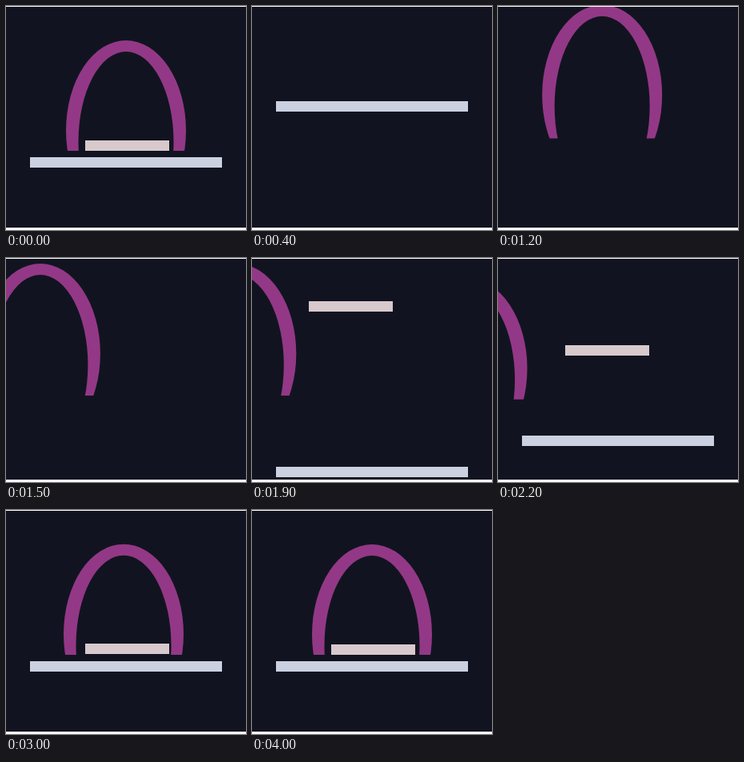
An HTML page with a canvas for the animation above (5100 ms loop, 300 by 280 pixels).

```html
<!DOCTYPE html>
<html lang="en">
<head>
<meta charset="utf-8">
<title>Arch and bars</title>
<style>
  html, body { margin: 0; width: 100%; height: 100%; overflow: hidden; background: #fff; }
  canvas { display: block; }
</style>
</head>
<body>
<canvas id="stage" width="300" height="280"></canvas>
<script>
const ctx = document.getElementById('stage').getContext('2d');
const LOOP = 5100;
const STEP = 100;

// Share of a decelerating move that is still to come: 1 at start, 0 at end.
function remaining(t, start, end, power = 3) {
  const left = (end - t) / (end - start);
  return Math.min(1, Math.max(0, left)) ** power;
}

// The outer ellipse minus a lowered inner one, cut off flat at the floor.
function drawArch(x, y, floor) {
  ctx.save();
  ctx.beginPath();
  ctx.rect(0, 0, 300, floor);
  ctx.clip();
  ctx.beginPath();
  ctx.ellipse(x, y, 75, 112.5, 0, 0, Math.PI * 2);
  ctx.closePath();
  ctx.moveTo(x + 59.5, y + 14);
  ctx.ellipse(x, y + 14, 59.5, 112.5, 0, 0, Math.PI * 2);
  ctx.fillStyle = '#933886';
  ctx.fill('evenodd');
  ctx.restore();
}

function drawMovingArch(t) {
  const x = t <= 2500
    ? -43.5 + 361.5 * remaining(t, 800, 2645)
    : 150 - 193.5 * remaining(t, 2500, 3166);
  const fall = remaining(t, 800, 1400, 2);
  const drift = remaining(t, 1900, 3300);
  drawArch(x, 155.5 - 74 * fall - 36 * drift, 181 - 59 * fall - 9 * drift);
}

function drawBar(x, y, width, color) {
  ctx.fillStyle = color;
  ctx.fillRect(Math.round(x), Math.round(y), width, 13);
}

const drawBase = y => drawBar(30, y, 240, '#cbd1e0');
const drawSill = lift => drawBar(99 - 0.245 * lift, 168 - lift, 105, '#d8c9cd');

function draw(t) {
  ctx.fillStyle = '#fff';
  ctx.fillRect(0, 0, 300, 280);
  ctx.save();
  ctx.beginPath();
  ctx.rect(0, 1, 300, 276);
  ctx.clip();
  ctx.fillStyle = '#111420';
  ctx.fillRect(0, 0, 300, 280);

  if (t < 100) {
    drawArch(150, 155.5, 181);
    drawSill(0);
    drawBase(189);
  } else if (t >= 400 && t < 600) {
    drawBase(119 + 1.2 * (t - 400));
  } else if (t >= 800) {
    drawMovingArch(t);
    drawSill(258 * remaining(t, 1400, 3200, 2.5));
    drawBase(189 + 192 * remaining(t, 1400, 3191));
  }
  ctx.restore();
}

function frame() {
  draw(Math.floor(performance.now() % LOOP / STEP) * STEP);
  requestAnimationFrame(frame);
}
frame();
</script>
</body>
</html>
```
